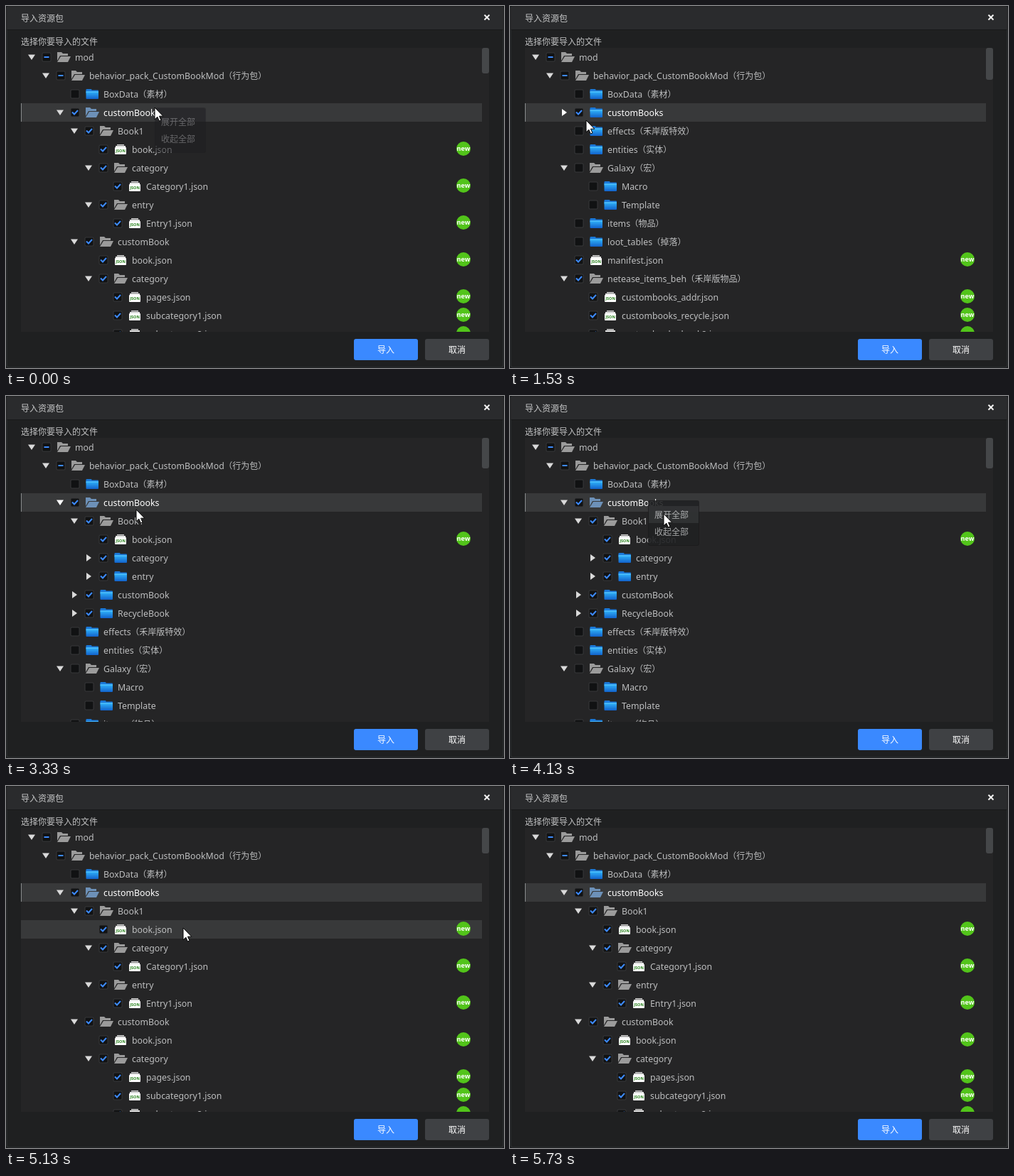
Write an HTML page with a canvas that moves like this. It is 700 by 510 pixels and loops after 6.14 s.

```html
<!DOCTYPE html>
<html lang="zh-CN">
<head>
<meta charset="utf-8">
<title>导入资源包</title>
<style>
html, body { margin: 0; width: 100%; height: 100%; overflow: hidden; background: #17191b; }
canvas { display: block; }
</style>
</head>
<body>
<canvas id="stage" width="700" height="510"></canvas>
<script>
const ctx = document.getElementById('stage').getContext('2d');
const LOOP = 6140, STEP = 200 / 3;
const CJK = '"Noto Sans CJK SC", "Noto Sans CJK", sans-serif';
const LATIN = '"Noto Sans", "Open Sans", sans-serif';
const LIST = { x: 21, y: 59, w: 648, h: 400 }, ROW = 26, SELECTED = 3;

// Row notation: depth, icon (o open, c closed, f plain folder, j file), check (v, -, _), label
const head = ['0o-mod', '1o-behavior_pack_CustomBookMod（行为包）', '2f_BoxData（素材）'];
const tail = ['2f_effects（禾岸版特效）', '2f_entities（实体）', '2o_Galaxy（宏）', '3f_Macro',
  '3f_Template', '2f_items（物品）', '2f_loot_tables（掉落）', '2jvmanifest.json',
  '2ovnetease_items_beh（禾岸版物品）', '3jvcustombooks_addr.json',
  '3jvcustombooks_recycle.json', '3jvcustombooks_book2.json'];
const otherBooks = ['3cvcustomBook', '3cvRecycleBook'];
const trees = {
  collapsed: { thumb: 45, rows: [...head, '2cvcustomBooks', ...tail] },
  books: { thumb: 44, rows: [...head, '2ovcustomBooks', '3cvBook1', ...otherBooks, ...tail] },
  firstBook: { thumb: 43, rows: [...head, '2ovcustomBooks', '3ovBook1', '4jvbook.json',
    '4cvcategory', '4cventry', ...otherBooks, ...tail] },
  expanded: { thumb: 36, rows: [...head, '2ovcustomBooks', '3ovBook1', '4jvbook.json',
    '4ovcategory', '5jvCategory1.json', '4oventry', '5jvEntry1.json', '3ovcustomBook',
    '4jvbook.json', '4ovcategory', '5jvpages.json', '5jvsubcategory1.json',
    '5jvsubcategory2.json'] }
};

// Cursor path: step, x, y
const path = [[0, 209, 143], [1, 215, 151], [4, 245, 191], [6, 245, 191], [8, 245, 186],
  [9, 245, 186], [10, 245, 183], [18, 245, 183], [23, 107, 161], [27, 77, 150], [31, 76, 149],
  [35, 76, 149], [38, 87, 169], [48, 87, 169], [50, 183, 160], [51, 183, 159], [54, 183, 159],
  [57, 194, 149], [59, 194, 149], [64, 230, 178], [76, 230, 178], [81, 326, 286], [86, 440, 515]];

function cursorAt(step) {
  const i = path.findIndex(p => p[0] > step);
  if (i < 0) return path.at(-1).slice(1);
  const [a, b] = [path[i - 1], path[i]], u = (step - a[0]) / (b[0] - a[0]);
  return [1, 2].map(n => Math.round(a[n] + (b[n] - a[n]) * u));
}

function treeAt(step) {
  if (step < 18 || step >= 70) return trees.expanded;
  return step < 28 ? trees.collapsed : step < 45 ? trees.books : trees.firstBook;
}

function menuAt(step) {
  const fade = start => Math.min(1, 0.35 + 0.1625 * (step - start));
  if (step < 18) return { x: 209, y: 143, alpha: fade(0) };
  if (step >= 60 && step < 70) return { x: 194, y: 147, alpha: fade(60) };
  return null;
}

function box(x, y, w, h, color, radius = 0) {
  ctx.fillStyle = color;
  ctx.beginPath();
  ctx.roundRect(x, y, w, h, radius);
  ctx.fill();
}

function poly(color, ...points) {
  ctx.fillStyle = color;
  ctx.beginPath();
  points.forEach(p => ctx.lineTo(...p));
  ctx.closePath();
  ctx.fill();
}

function line(color, width, ...points) {
  ctx.strokeStyle = color;
  ctx.lineWidth = width;
  ctx.beginPath();
  points.forEach(p => ctx.lineTo(...p));
  ctx.stroke();
}

function text(str, x, y, color, font = '12px ' + CJK, align = 'left') {
  ctx.font = font;
  ctx.fillStyle = color;
  ctx.textAlign = align;
  ctx.fillText(str, x, y);
}

function label(str, x, y, color) {
  const cut = (str + '（').indexOf('（'), latin = str.slice(0, cut);
  text(latin, x, y, color, '12.35px ' + LATIN);
  text(str.slice(cut), x + ctx.measureText(latin).width - 0.5, y, color);
}

function arrow(x, y, open, color) {
  if (open) poly(color, [x - 5, y - 3.5], [x + 5, y - 3.5], [x, y + 4]);
  else poly(color, [x - 3, y - 5], [x + 4, y], [x - 3, y + 5]);
}

function checkbox(x, y, mark) {
  box(x - 6.5, y - 6.5, 13, 13, '#38393b', 2);
  box(x - 5.5, y - 5.5, 11, 11, '#111213', 1);
  if (mark === 'v') line('#3d8bff', 2, [x - 4, y - 0.5], [x - 1, y + 2.5], [x + 4, y - 3]);
  if (mark === '-') box(x - 3.5, y - 1, 7, 2, '#3d8bff');
}

function openFolder(x, y, color) {
  poly(color, [x - 9, y + 5], [x - 9, y - 7], [x - 3, y - 7], [x - 1, y - 5], [x + 6, y - 5],
    [x + 6, y - 2], [x - 5, y - 2]);
  poly(color, [x - 4, y - 1], [x + 10, y - 1], [x + 6, y + 7], [x - 9, y + 7]);
}

function closedFolder(x, y) {
  const blue = ctx.createLinearGradient(0, y - 3, 0, y + 7);
  blue.addColorStop(0, '#2fb0f8');
  blue.addColorStop(1, '#1262cb');
  box(x - 8.5, y - 7, 8, 4, '#1a78d8', 1);
  box(x - 8.5, y - 5.5, 17.5, 5, '#1a78d8', 1);
  box(x - 8.5, y - 3.5, 17.5, 10.5, blue, 1);
  box(x - 8.5, y - 3.5, 17.5, 1, '#63ccff');
}

function jsonFile(x, y) {
  box(x - 5, y - 7, 10, 1.5, '#d8d8d8');
  box(x - 7, y - 5, 14, 2, '#e6e6e6');
  box(x - 8, y - 3, 16, 10, '#fff', 1);
  text('JSON', x, y + 4, '#248018', 'bold 5.5px ' + LATIN, 'center');
}

function badge(y) {
  box(633, y - 11, 20, 20, '#52c41a', 10);
  text('new', 643, y + 2, '#fff', 'bold 9px ' + LATIN, 'center');
}

function drawRow(row, i, hovered) {
  const [depth, icon, mark] = row, y = LIST.y + ROW * i + 13, dx = depth * 20;
  const selected = i === SELECTED;
  if (selected || hovered) box(LIST.x, y - 13, LIST.w, ROW, '#38393a');
  if (selected) box(LIST.x, y - 13, 1, ROW, '#8a8c8e');
  if (icon === 'o' || icon === 'c') arrow(36 + dx, y, icon === 'o', hovered ? '#fff' : '#dadada');
  checkbox(57 + dx, y, mark);
  if (icon === 'o') openFolder(81 + dx, y, selected ? '#6d91b8' : '#9b9b9b');
  else if (icon === 'j') { jsonFile(81 + dx, y); badge(y); }
  else closedFolder(81 + dx, y);
  label(row.slice(3), 97 + dx, y + 5, selected ? '#fff' : '#bdbebf');
}

function drawWindow() {
  box(0, 0, 700, 510, '#17191b');
  box(0.5, 0.5, 699, 509, '#2e3032', 4);
  box(1.5, 1.5, 697, 507, '#1f2021', 3);
  box(1.5, 1.5, 697, 31.5, '#2a2b2d', [3, 3, 0, 0]);
  box(1.5, 33, 697, 1, '#18191a');
  text('导入资源包', 21, 22, '#c6c7c8');
  line('#f2f2f2', 2, [672.5, 12.5], [679.5, 19.5]);
  line('#f2f2f2', 2, [679.5, 12.5], [672.5, 19.5]);
  text('选择你要导入的文件', 21, 55, '#c0c1c2');
  box(489, 469, 90, 30, '#3a89ff', 3);
  text('导入', 534, 489, '#fff', undefined, 'center');
  box(589, 469, 90, 30, '#3f4144', 3);
  text('取消', 634, 489, '#fff', undefined, 'center');
}

function drawList(tree, hoverIndex) {
  ctx.save();
  ctx.beginPath();
  ctx.rect(LIST.x, LIST.y, 658, LIST.h);
  ctx.clip();
  box(LIST.x, LIST.y, 658, LIST.h, '#252526');
  tree.rows.slice(0, 16).forEach((row, i) => drawRow(row, i, i === hoverIndex));
  box(669, LIST.y, 10, tree.thumb, '#454749', 3);
  ctx.restore();
}

function drawMenu({ x, y, alpha }, pointerY) {
  ctx.globalAlpha = alpha;
  box(x, y, 72, 64, '#18191a', 3);
  box(x + 1, y + 1, 70, 62, '#232425', 2);
  ['展开全部', '收起全部'].forEach((item, i) => {
    const top = y + 8 + 24 * i;
    if (pointerY >= top && pointerY < top + 24) box(x + 1, top, 70, 24, '#38393a');
    text(item, x + 9, top + 16.5, '#e8e9ea');
  });
  ctx.globalAlpha = 1;
}

function drawCursor(x, y) {
  ctx.save();
  ctx.translate(x, y);
  const shape = [[0, 0], [0, 16.8], [3.8, 13.2], [6.4, 19], [9, 17.9], [6.5, 12.2], [11.8, 12.2], [0, 0]];
  poly('#fff', ...shape);
  line('#000', 1, ...shape);
  ctx.restore();
}

function draw(now) {
  const step = Math.floor((now % LOOP + 4) / STEP);
  const [x, y] = cursorAt(step), menu = menuAt(step);
  drawWindow();
  drawList(treeAt(step), menu ? -1 : Math.floor((y - LIST.y) / ROW));
  if (menu) drawMenu(menu, y);
  drawCursor(x, y);
}

const start = performance.now();
function tick() {
  draw(performance.now() - start);
  requestAnimationFrame(tick);
}
tick();
</script>
</body>
</html>
```
